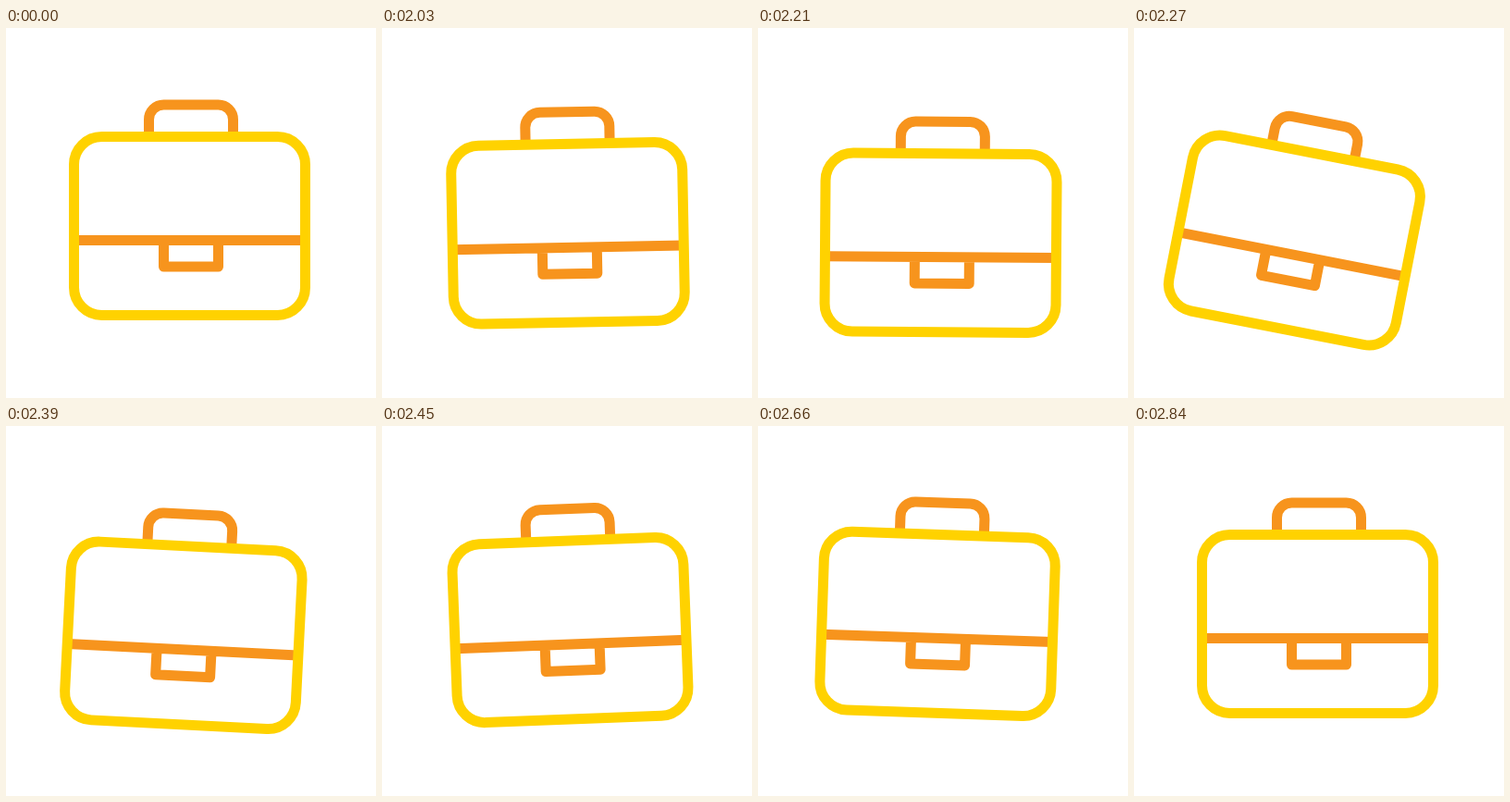
An HTML page with a canvas that plays this animation: 400 px wide and 400 px high, repeating every 2870 ms.

```html
<!DOCTYPE html>
<html lang="en">
<head>
<meta charset="utf-8">
<title>Briefcase</title>
<style>
  html, body { margin: 0; width: 100%; height: 100%; overflow: hidden; background: #fff; }
  canvas { display: block; width: 400px; height: 400px; }
</style>
</head>
<body>
<canvas id="stage" width="400" height="400"></canvas>
<script>
const ctx = document.getElementById('stage').getContext('2d');
const LOOP = 2870, START = 2030, END = 2840, STEP = 30;
const YELLOW = '#ffd200', ORANGE = '#f7941d';
const PIVOT = { x: 200, y: 83 };

// Swing peaks: time in ms, angle in degrees
const SWING = [[1999, 0], [2143, -9.1], [2285, 11.7], [2466, -2.5], [2640, 2], [2840, 0]];

const clamp = v => Math.min(1, Math.max(0, v));
const span = (t, a, b) => clamp((t - a) / (b - a));
const smooth = p => p * p * (3 - 2 * p);

function angleAt(t) {
  for (let i = 1; i < SWING.length; i++) {
    const [t0, a0] = SWING[i - 1], [t1, a1] = SWING[i];
    if (t < t1) return a0 + (a1 - a0) * smooth(span(t, t0, t1));
  }
  return 0;
}

function dropAt(t) {
  const down = 1 - Math.pow(1 - span(t, 2000, 2210), 3.64);
  const up = smooth(span(t, 2290, 2560));
  return 18.2 * (down - up);
}

function stroke(color, trace) {
  ctx.strokeStyle = color;
  ctx.beginPath();
  trace();
  ctx.stroke();
}

function drawCase() {
  ctx.lineWidth = 11;
  ctx.lineJoin = 'round';
  stroke(ORANGE, () => {
    // handle
    ctx.moveTo(154.5, 117);
    ctx.arcTo(154.5, 83, 200, 83, 16);
    ctx.arcTo(245.5, 83, 245.5, 117, 16);
    ctx.lineTo(245.5, 117);
    // divider
    ctx.moveTo(74, 229.5);
    ctx.lineTo(323, 229.5);
    // lock
    ctx.moveTo(170.5, 229.5);
    ctx.lineTo(170.5, 258);
    ctx.lineTo(229.5, 258);
    ctx.lineTo(229.5, 229.5);
  });
  stroke(YELLOW, () => ctx.roundRect(73.5, 117.5, 250, 193, 30));
}

function render(t) {
  ctx.fillStyle = '#fff';
  ctx.fillRect(0, 0, 400, 400);
  ctx.save();
  if (t >= START && t < END) {
    const s = START + Math.floor((t - START) / STEP) * STEP;
    ctx.translate(PIVOT.x, PIVOT.y + dropAt(s));
    ctx.rotate(angleAt(s) * Math.PI / 180);
    ctx.translate(-PIVOT.x, -PIVOT.y);
  }
  drawCase();
  ctx.restore();
}

const origin = performance.now();
function tick() {
  render((performance.now() - origin) % LOOP);
  requestAnimationFrame(tick);
}
tick();
</script>
</body>
</html>
```
